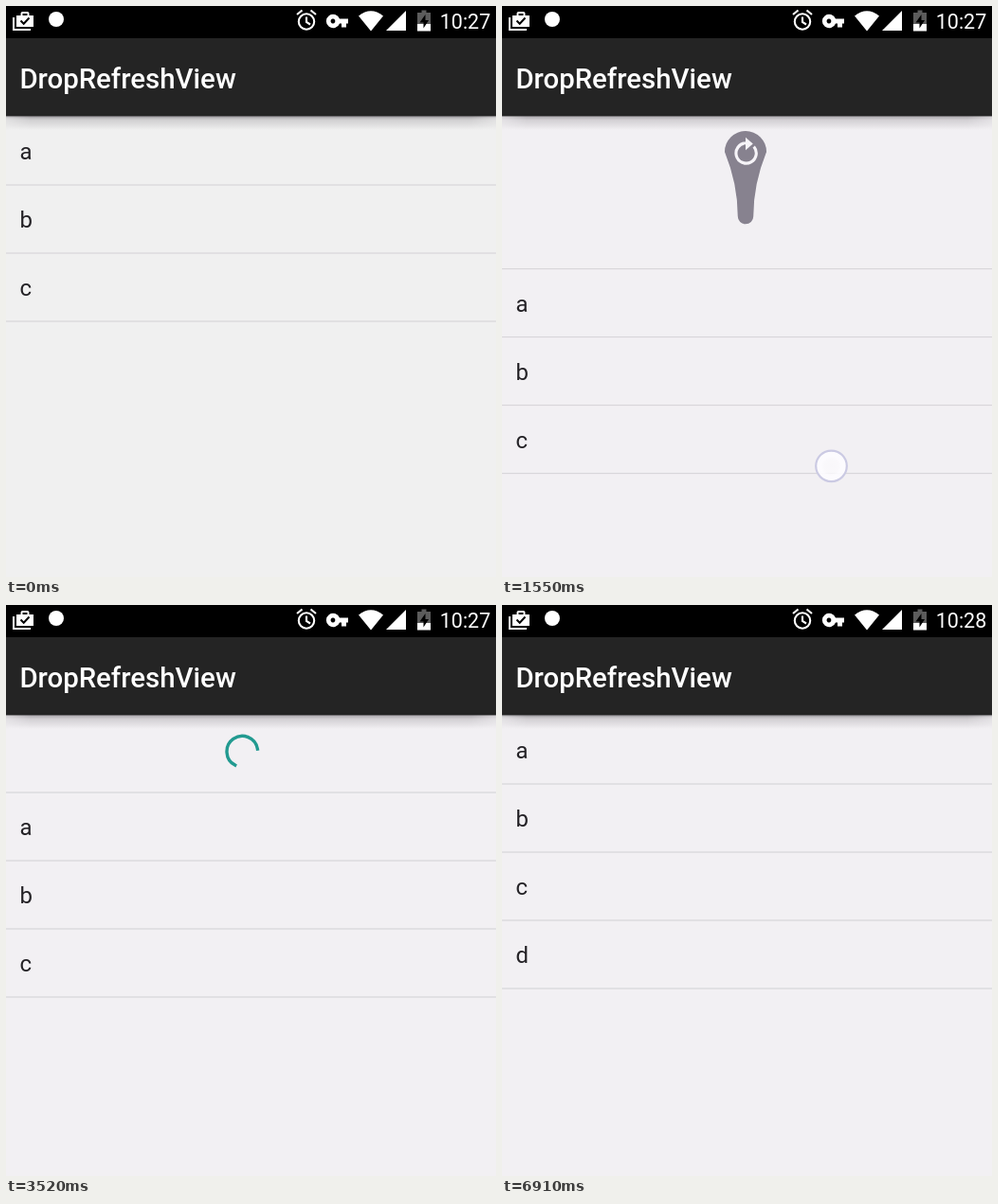
An HTML page that plays this animation: 517 px wide and 603 px high, repeating every 7.52 s.

```html
<!DOCTYPE html>
<html lang="en">
<head>
<meta charset="utf-8">
<title>DropRefreshView</title>
<style>
  html, body { margin: 0; width: 100%; height: 100%; overflow: hidden; background: #f1eff2; }
  svg { display: block; width: 100%; height: 100%; font-family: Roboto, sans-serif; }
</style>
</head>
<body>
<svg viewBox="0 0 517 603" xmlns="http://www.w3.org/2000/svg">
  <defs>
    <linearGradient id="shade" x1="0" y1="0" x2="0" y2="1">
      <stop offset="0" stop-color="#3a343c" stop-opacity=".4"/>
      <stop offset=".3" stop-color="#3a343c" stop-opacity=".17"/>
      <stop offset="1" stop-color="#3a343c" stop-opacity="0"/>
    </linearGradient>
    <linearGradient id="ends">
      <stop offset="0" stop-color="#777"/>
      <stop offset=".05" stop-color="#fff"/>
      <stop offset=".95" stop-color="#fff"/>
      <stop offset="1" stop-color="#777"/>
    </linearGradient>
    <mask id="shadeMask"><rect y="116" width="517" height="15" fill="url(#ends)"/></mask>
    <radialGradient id="glow">
      <stop offset="0" stop-color="#fdfcff" stop-opacity=".62"/>
      <stop offset=".45" stop-color="#fdfcff" stop-opacity=".72"/>
      <stop offset=".65" stop-color="#fdfcff" stop-opacity=".92"/>
      <stop offset="1" stop-color="#fdfcff" stop-opacity=".92"/>
    </radialGradient>
    <clipPath id="headClip"><rect id="headBox" y="117" width="517" height="0"/></clipPath>
    <clipPath id="rowClip"><rect y="261" width="517" height="72"/></clipPath>
  </defs>

  <rect id="page" width="517" height="603"/>

  <g clip-path="url(#headClip)">
    <g id="drop">
      <path id="blob" fill="#87828f"/>
      <g id="icon">
        <path d="M10.6 -7.5A13 13 0 1 1 0 -12" fill="none" stroke="#f6f4f8" stroke-width="3.8"/>
        <path d="M0 -19.5L9.5 -11L0 -2.8Z" fill="#f6f4f8"/>
      </g>
    </g>
    <path id="arc" fill="none" stroke="#229a90" stroke-width="3.4" stroke-linecap="square"/>
  </g>

  <g id="list" font-size="24" fill="#242226">
    <g clip-path="url(#rowClip)"><circle id="ripple" cx="347" cy="300" fill="#e4e2e4"/></g>
    <g id="rows"></g>
  </g>

  <circle id="touch" cx="347.5" r="16.3" fill="url(#glow)" stroke="#cbcae3" stroke-width="2.2"/>

  <rect y="116" width="517" height="15" fill="url(#shade)" mask="url(#shadeMask)"/>
  <rect width="517" height="116.4" fill="#242424"/>
  <rect width="517" height="34" fill="#000"/>
  <text x="14.4" y="87" font-size="29.4" font-weight="500" fill="#fff">DropRefreshView</text>

  <g fill="#fff">
    <path d="M11 10H15.500V8Q15.500 6 17.500 6H22.500Q24.500 6 24.500 8V10H29V22H11ZM17.500 8V10H22.500V8Z" fill-rule="evenodd"/>
    <path d="M15.500 15.500L18.700 18.700L24.500 12.500" fill="none" stroke="#000" stroke-width="2"/>
    <path d="M8 12V25H26" fill="none" stroke="#fff" stroke-width="2"/>
    <circle cx="53" cy="14" r="8"/>
    <g fill="none" stroke="#fff" stroke-width="2.1">
      <circle cx="317" cy="16.500" r="8.200"/>
      <path d="M317 11.500V17L321 19.500M307 9L312.500 4.500M327 9L321.500 4.500"/>
    </g>
    <path d="M352 13.500A7.300 7.300 0 1 0 352 18.500H354V22.500H359V18.500H361V13.500ZM345 13.600A2.400 2.400 0 1 1 344.900 13.600Z" fill-rule="evenodd"/>
    <path d="M372 10.500Q385 0 398 10.500L385 26.500Z"/>
    <path d="M422 5V26H401Z"/>
    <path d="M438.500 4.500H443.500V7H448V19H434V7H438.500Z" fill="#5c5c5c"/>
    <path d="M434 19H448V26.500H434Z"/>
    <path d="M442.500 9L436.500 17.500H440.500V23.500L446 15H442.500Z" fill="#000"/>
    <text id="clock" x="511.3" y="24" font-size="21.5" text-anchor="end"></text>
  </g>

  <path id="cursor" d="M502 599V614L505.500 611L508 616L510 615L508 610H512Z" fill="#111" stroke="#fff" stroke-width=".6"/>
</svg>
<script>
const LOOP = 7520, SPIN_AT = 1866, SPIN = 1282, SNAP = 1650, SETTLE = 2400, ADDED = 6740;
const $ = id => document.getElementById(id);
const set = (id, attrs) => { for (const k in attrs) $(id).setAttribute(k, attrs[k]); };
const show = (id, on) => set(id, { visibility: on ? 'visible' : 'hidden' });
const clamp = v => Math.max(0, Math.min(1, v));
const span = (t, a, b) => clamp((t - a) / (b - a));
const easeOut = v => 1 - (1 - v) ** 3;

const PULL = [[540, 0], [910, 75], [1210, 123], [1270, 137], [2010, 199], [2130, 203]];
const FINGER = [[560, 318], [910, 393], [1210, 438], [1270, 449], [2010, 546], [2130, 553]];

$('rows').innerHTML = [...'abcd'].map((c, i) => `<g id="row${c}">
  <text x="14.4" y="${162 + 72 * i}">${c}</text>
  <rect class="rule" y="${188.4 + 72 * i}" width="517" height="1.2"/></g>`).join('') +
  '<rect class="rule" y="116.4" width="517" height="1.2"/>';
document.querySelectorAll('.rule').forEach(r => r.setAttribute('fill', '#d8d6da'));

function track(keys, t) {
  if (t <= keys[0][0]) return keys[0][1];
  for (let i = 1; i < keys.length; i++) {
    const [a, u] = keys[i - 1], [b, v] = keys[i];
    if (t < b) return u + (v - u) * span(t, a, b);
  }
  return keys[keys.length - 1][1];
}

function pullAt(t) {
  if (t < SETTLE) return track(PULL, t);
  if (t < ADDED) return 203 - 122 * easeOut(span(t, SETTLE, 2800));
  const v = span(t, ADDED, 6910);
  return 81 * (1 - v * (.85 + .15 * v));
}

// Cubic bezier (.4, 0, .2, 1), solved by bisection.
function fastOutSlowIn(x) {
  if (x <= 0 || x >= 1) return clamp(x);
  let lo = 0, hi = 1, s = .5;
  for (let i = 0; i < 20; i++) {
    s = (lo + hi) / 2;
    const q = 1 - s;
    if (1.2 * s * q * q + .6 * s * s * q + s ** 3 < x) lo = s; else hi = s;
  }
  return s * s * (3 - 2 * s);
}

function drawDrop(t, pull) {
  const free = Math.max(0, pullAt(Math.min(t, SNAP)) - 75) / 62;
  const p = free * (1 - easeOut(span(t, SNAP, 1850)));
  const r1 = 25.5 - 2.5 * p, r2 = 25.5 - 12.5 * p;
  const y1 = 132 + r1, y2 = 183 + 34.3 * p - r2;
  const x = 257, mid = (y1 + y2) / 2;
  set('blob', { d: `M${x - r1} ${y1}A${r1} ${r1} 0 0 1 ${x + r1} ${y1}` +
    `Q${x + r2} ${mid} ${x + r2} ${y2}A${r2} ${r2} 0 0 1 ${x - r2} ${y2}` +
    `Q${x - r2} ${mid} ${x - r1} ${y1}Z` });
  set('icon', { transform: `translate(${x} ${y1 + .6}) scale(${1 - .13 * p})` });
  show('drop', pull > 0 && t < SPIN_AT);
}

function drawSpinner(t) {
  const on = t >= SPIN_AT && t < ADDED;
  show('arc', on);
  if (!on) return;
  const turns = (t - SPIN_AT) / SPIN, u = turns % 1;
  const base = 144 * turns + 90 * u - 4;
  const from = base + 270 * fastOutSlowIn(2 * u - 1);
  const to = Math.max(from + .5, base + 270 * fastOutSlowIn(2 * u));
  const at = deg => {
    const a = deg * Math.PI / 180;
    return `${249.3 + 16.3 * Math.sin(a)} ${154.7 - 16.3 * Math.cos(a)}`;
  };
  set('arc', { d: `M${at(from)}A16.3 16.3 0 ${to - from > 180 ? 1 : 0} 1 ${at(to)}` });
}

function draw(t) {
  const pull = pullAt(t);
  set('page', { fill: t < 500 ? '#f0f0f0' : '#f2f0f3' });
  set('headBox', { height: pull });
  set('list', { transform: `translate(0 ${pull})` });
  show('rowd', t >= ADDED);
  set('ripple', { r: 346 * Math.sqrt(span(t, 590, 910)), opacity: 1 - span(t, 940, 1200) });
  set('touch', { cy: track(FINGER, t) });
  show('touch', t >= 500 && t < SETTLE);
  drawDrop(t, pull);
  drawSpinner(t);
  $('clock').textContent = t < 4030 ? '10:27' : '10:28';
  show('cursor', t >= 5820 && t < 6110);
}

function tick() {
  draw(performance.now() % LOOP);
  requestAnimationFrame(tick);
}
tick();
</script>
</body>
</html>
```
